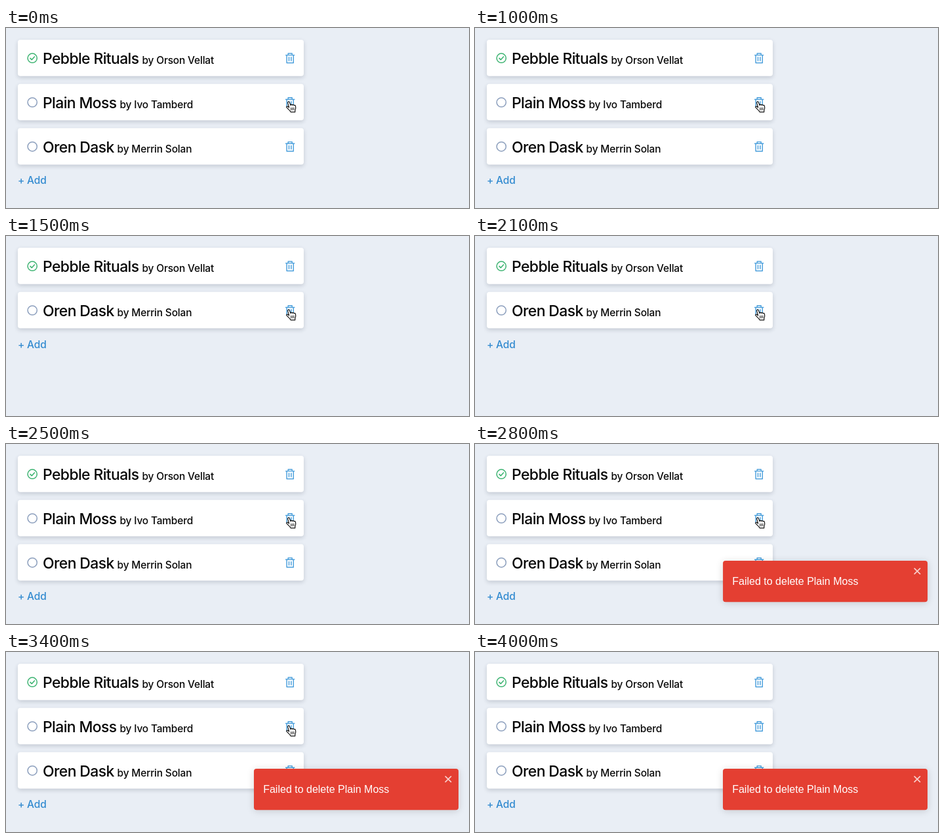
Animation of 706x276 px, one loop 4.1 s. Source, as an HTML page with a canvas:

```html
<!DOCTYPE html>
<html lang="en">
<head>
<meta charset="utf-8">
<title>Reading list</title>
<style>
html, body { margin: 0; width: 100%; height: 100%; overflow: hidden; background: #e9eef5; }
canvas { display: block; }
</style>
</head>
<body>
<canvas id="stage" width="706" height="276"></canvas>
<script>
const ctx = document.getElementById('stage').getContext('2d');
const LOOP = 4100, REMOVE = 1300, RESTORE = 2500, TOAST = 2466, HIDE_CURSOR = 3600;
const PITCH = 67.8;
const SANS = 'Inter, "Noto Sans", sans-serif';
const TITLE = '450 23px ' + SANS, BODY = '450 15.5px ' + SANS;

const books = [
  { title: 'Pebble Rituals', author: 'Orson Vellat', done: true },
  { title: 'Plain Moss', author: 'Ivo Tamberd' },
  { title: 'Oren Dask', author: 'Merrin Solan' }
];

function text(str, x, y, font, color, spacing = 0) {
  ctx.font = font;
  ctx.letterSpacing = spacing + 'px';
  ctx.fillStyle = color;
  ctx.fillText(str, x, y);
  return ctx.measureText(str).width;
}

function shadowBox(x, y, w, h, color, shadow, blur, drop) {
  ctx.save();
  ctx.shadowColor = shadow;
  ctx.shadowBlur = blur;
  ctx.shadowOffsetY = drop;
  ctx.fillStyle = color;
  ctx.beginPath();
  ctx.roundRect(x, y, w, h, 4);
  ctx.fill();
  ctx.restore();
}

function stroke(path, color, width, x = 0, y = 0) {
  ctx.save();
  ctx.translate(x, y);
  ctx.strokeStyle = color;
  ctx.lineWidth = width;
  ctx.lineCap = ctx.lineJoin = 'round';
  ctx.stroke(path);
  ctx.restore();
}

const ring = new Path2D('M7.1 0A7.1 7.1 0 1 1 -7.1 0A7.1 7.1 0 1 1 7.1 0Z');
const tick = new Path2D('M-3.2 .2L-.9 2.5L3.3 -2.2');
const bin = new Path2D('M-6.6 -4.6H6.6M-3 -4.8V-7.2H3V-4.8M-5.1 -4.4V7.2H5.1V-4.4M-1.7 -1.4V4M1.7 -1.4V4');
const cross = new Path2D('M-4.2 -4.2L4.2 4.2M4.2 -4.2L-4.2 4.2');
const hand = new Path2D('M4.6 10.4L2.7 3.6C2.1 1.4 4.6 .6 5.4 2.6L7 7C7 5.6 9 5.3 9.6 6.8C10 5.7 11.7 5.9 12.2 7.2C12.8 6.4 14.2 6.8 14.5 8.4C15 10.6 14.9 12.6 13.9 14.4L13.7 17.4H7.2C6.6 15.2 3.6 13.4 1 10.4C.1 8.8 1.8 8 3 9Z');
const knuckles = new Path2D('M7.7 11V14.4M9.8 10.8V14.3M11.9 10.7V14.2');

function drawRow(book, i) {
  const y = 18 + i * PITCH, mid = y + 28.2;
  shadowBox(18, y, 436, 55.8, '#fff', 'rgba(30,40,60,.18)', 6, 2.5);
  stroke(ring, book.done ? '#3cb371' : '#8c9fbd', 1.5, 40.2, mid);
  if (book.done) stroke(tick, '#3cb371', 1.6, 40.2, mid);
  const w = text(book.title, 56, y + 37.3, TITLE, '#080808', -0.65);
  text('by ' + book.author, 56 + w + 5, y + 37.3, BODY, '#080808', -0.2);
  stroke(bin, '#4a9fdc', 1.45, 433.2, mid);
}

// Piecewise ease-out bounce, entering from the right.
function bounce(ms) {
  const keys = [[0, 3000], [0.6, -25], [0.75, 10], [0.9, -5], [1, 0]];
  const p = ms / 700;
  if (p >= 1) return 0;
  const k = keys.findIndex(key => key[0] > p);
  const [t0, a] = keys[k - 1], [t1, b] = keys[k];
  return b + (a - b) * (1 - (p - t0) / (t1 - t0)) ** 3;
}

function drawToast(ms) {
  const x = 378 + bounce(ms);
  if (x > 730) return;
  shadowBox(x, 179, 312, 63.3, '#e43f32', 'rgba(0,0,0,.15)', 12, 1.5);
  text('Failed to delete ' + books[1].title, x + 14.2, 215.5,
    '16px "Liberation Sans", Arial, sans-serif', '#fff');
  stroke(cross, 'rgba(255,255,255,.75)', 1.7, x + 296.3, 195);
}

function drawCursor(x, y) {
  ctx.save();
  ctx.translate(x, y);
  ctx.fillStyle = '#fff';
  ctx.fill(hand);
  ctx.restore();
  stroke(hand, '#111', 1.2, x, y);
  stroke(knuckles, '#111', 0.9, x, y);
}

function draw(t) {
  ctx.fillStyle = '#e9eef5';
  ctx.fillRect(0, 0, 706, 276);
  const removed = t >= REMOVE && t < RESTORE;
  const rows = removed ? [books[0], books[2]] : books;
  rows.forEach(drawRow);
  text('+ Add', 18, 36 + rows.length * PITCH, BODY, '#338bd0', -0.2);
  if (t >= TOAST) drawToast(t - TOAST);
  if (t < HIDE_CURSOR) drawCursor(427, 111.5);
}

const start = performance.now();
function tickFrame() {
  draw((performance.now() - start) % LOOP);
  requestAnimationFrame(tickFrame);
}
tickFrame();
</script>
</body>
</html>
```
